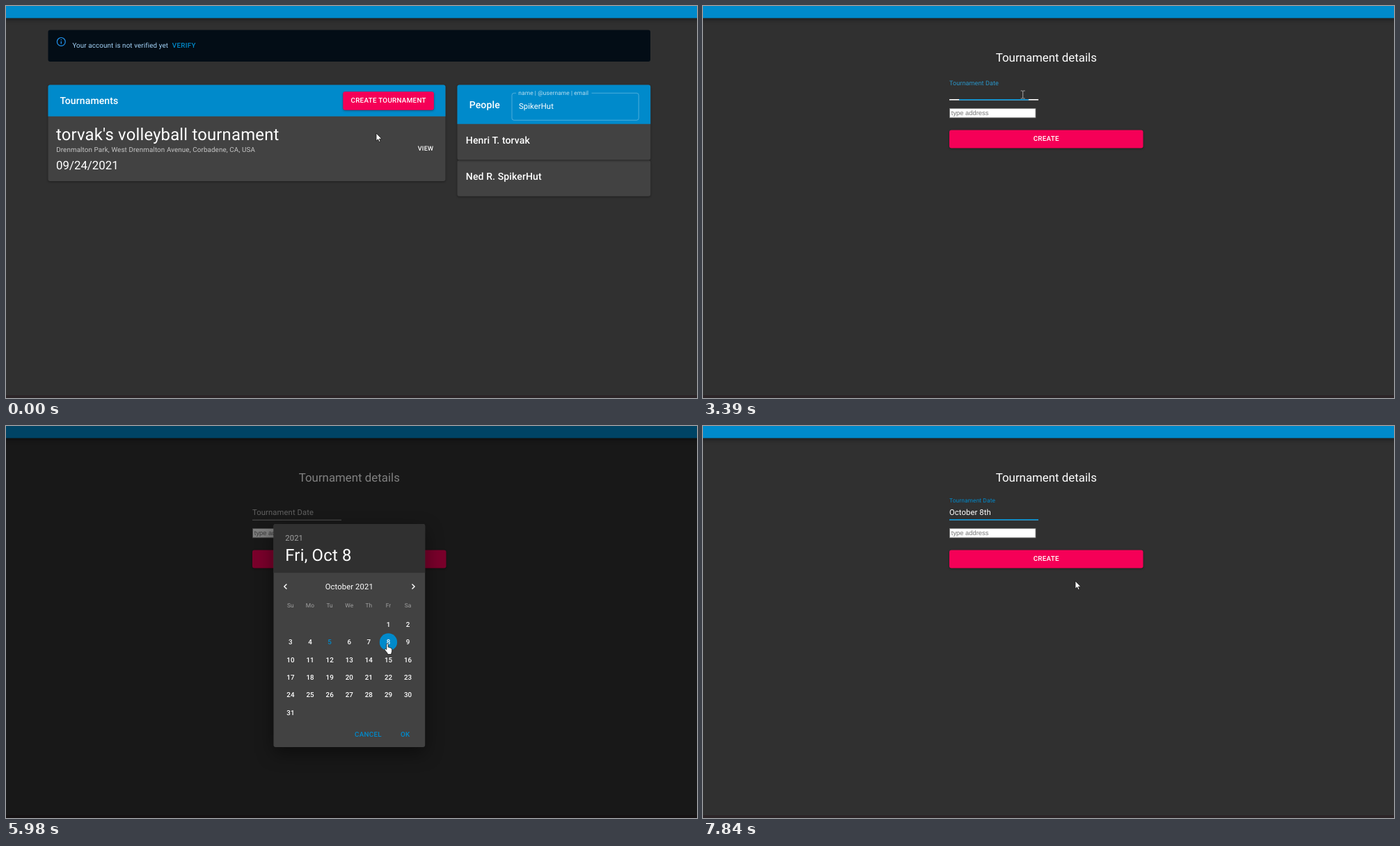
An HTML page that plays this animation: 993 by 564 pixels, repeating every 7990 ms.

```html
<!DOCTYPE html>
<html lang="en">
<head>
<meta charset="utf-8">
<title>Create a tournament</title>
<style>
  html, body { margin: 0; width: 100%; height: 100%; overflow: hidden; background: #303030; }
  svg { display: block; font-family: Roboto, sans-serif; text-rendering: geometricPrecision; }
  text { fill: #fff; white-space: pre; }
  .h4 { font-size: 23.9px; letter-spacing: .00735em; }
  .h5 { font-size: 16.87px; }
  .h6 { font-size: 14.06px; font-weight: 500; letter-spacing: .0075em; }
  .body { font-size: 11.25px; letter-spacing: .00938em; }
  .small { font-size: 9.84px; letter-spacing: .01071em; }
  .cap { font-size: 8.44px; letter-spacing: .00938em; }
  .btn { font-size: 9.84px; font-weight: 500; letter-spacing: .02857em; }
  .day { font-size: 9.84px; font-weight: 500; }
  .mid { text-anchor: middle; }
  .blue { fill: #008acb; }
  .paper { fill: #424242; }
  .pink { fill: #f50057; }
  .line { fill: none; stroke: #fff; }
  .lift { filter: drop-shadow(0 1.4px 1.6px rgba(0,0,0,.4)); }
  .bar { filter: drop-shadow(0 2px 3px rgba(0,0,0,.45)); }
  .high { filter: drop-shadow(0 9px 13px rgba(0,0,0,.45)); }
</style>
</head>
<body>
<svg width="993" height="564" viewBox="0 0 993 564">
  <rect width="993" height="564" fill="#303030"/>

  <g id="home">
    <rect x="60.5" y="34.5" width="865.5" height="45.5" rx="3" fill="#030d16"/>
    <circle cx="79.3" cy="51.4" r="5.9" class="line" style="stroke:#2196f3" stroke-width="1.2"/>
    <path d="M79.3 47.9v1.4M79.3 50.8v3.7" stroke="#2196f3" stroke-width="1.3"/>
    <text class="small" x="95.4" y="59.8" style="fill:#a6d5fa">Your account is not verified yet</text>
    <text class="btn blue" x="238.8" y="59.8">VERIFY</text>

    <rect class="paper lift" x="60.5" y="113.5" width="571" height="138.5" rx="3"/>
    <path class="blue" d="M60.5 158.7v-42.2q0-3 3-3h565q3 0 3 3v42.2z"/>
    <text class="h6" x="77.5" y="141.2">Tournaments</text>
    <rect id="add" class="pink lift" x="484.3" y="123.3" width="130.6" height="26.4" rx="3"/>
    <text class="btn" x="495.5" y="138.6">CREATE TOURNAMENT</text>
    <text class="h4" x="72" y="193">torvak's volleyball tournament</text>
    <text class="small" x="72.2" y="209.9" style="fill:#c6c6c6">Drenmalton Park, West Drenmalton Avenue, Corbadene, CA, USA</text>
    <text class="h5" x="72" y="234.6">09/24/2021</text>
    <text class="btn" x="591.7" y="208.1" style="font-size:9.14px">VIEW</text>

    <rect class="paper lift" x="648.5" y="222" width="277.7" height="51.7" rx="3"/>
    <rect class="paper lift" x="648.5" y="113.5" width="277.7" height="108" rx="3"/>
    <path class="blue" d="M648.5 169.7v-53.2q0-3 3-3h271.7q3 0 3 3v53.2z"/>
    <text class="h6" x="665.7" y="146.9">People</text>
    <path class="line" stroke-opacity=".3" d="M733 125.3h-3q-3 0-3 3v33q0 3 3 3h176.2q3 0 3-3v-33q0-3-3-3H841.5"/>
    <text class="cap" x="736.3" y="128.2" style="fill:#b8deef">name | @username | email</text>
    <text class="body" x="737" y="148.3">SpikerHut</text>
    <text class="h6" x="660.8" y="198.2">Henri T. torvak</text>
    <text class="h6" x="660.8" y="250.2">Ned R. SpikerHut</text>
  </g>

  <g id="form">
    <text class="h5 mid" x="493.3" y="79.5">Tournament details</text>
    <text id="label" class="body" x="354">Tournament Date</text>
    <text id="value" class="body" x="354" y="128.2">October 8th</text>
    <rect id="rule" x="354" width="128" fill="#fff"/>
    <rect id="focus" class="blue" y="134" height="1.6"/>
    <rect x="354.4" y="147.4" width="123.6" height="13.4" fill="#fff" stroke="#777" stroke-width=".8"/>
    <text x="356.8" y="157.4" style="font:9.37px 'Liberation Sans',Arial,sans-serif;fill:#757575">type address</text>
    <rect class="pink lift" x="354" y="178.4" width="278.5" height="26" rx="3"/>
    <text class="btn mid" x="493.3" y="194">CREATE</text>
  </g>

  <rect class="blue bar" x="-10" y="-10" width="1013" height="27.4"/>
  <rect y="560" width="993" height="4" fill="#2c2527"/>
  <rect id="shade" width="993" height="564"/>

  <g id="dialog">
    <rect class="paper high" x="384.5" y="141" width="217.7" height="321" rx="3"/>
    <path d="M384.5 211.3V144q0-3 3-3h211.7q3 0 3 3v67.3z" fill="#303030"/>
    <text class="body" x="401.3" y="165" style="fill:#a0a0a0">2021</text>
    <text id="picked" class="h4" x="401.3" y="194"></text>
    <text class="body mid" x="493.3" y="235.2">October 2021</text>
    <path class="line" stroke-width="1.4" d="M403.4 227.4l-3.6 3.6 3.6 3.6M583.5 227.4l3.6 3.6-3.6 3.6"/>
    <circle id="hover" r="12.65" fill="#fff" fill-opacity=".09"/>
    <circle id="dot" class="blue" r="12.65"/>
    <g id="days"></g>
    <rect id="okHover" class="blue" x="552.5" y="431.5" width="44" height="24" rx="3" fill-opacity=".13"/>
    <text class="btn blue" x="501" y="446.8">CANCEL</text>
    <text class="btn blue" x="567" y="446.8">OK</text>
  </g>

  <g id="cursor" fill="#fff" stroke="#111" stroke-width=".8" stroke-linejoin="round">
    <path id="arrow" d="M0 0V11.2L2.6 8.8 4.3 12.6 6.1 11.8 4.4 8.2H8z"/>
    <path id="hand" d="M0 .4Q1.2 .4 1.2 1.7V5.7Q2.8 5.3 3.1 6.5 4.7 6 5 7.2 6.7 6.9 6.7 8.6V11.2Q6.7 13 5.9 14V16H.2V14.6L-3.2 10.4Q-4.3 9-3.4 8.2-2.4 7.6-1.2 9.2V1.7Q-1.2.4 0 .4Z"/>
    <path id="beam" d="M-3-5.5H-1L0-5 1-5.5H3M0-5V5M-3 5.5H-1L0 5 1 5.5H3" fill="none" stroke="#c4c4c4"/>
  </g>
</svg>

<script>
const LOOP = 7990;
const $ = id => document.getElementById(id);
const set = (id, attrs) => { for (const k in attrs) $(id).setAttribute(k, attrs[k]); };
const show = (id, on) => { $(id).style.display = on ? '' : 'none'; };
const mix = (a, b, p) => a + (b - a) * p;

// Row in force at time t; each row starts with its time.
const held = (rows, t) => rows.findLast(r => r[0] <= t);

const CURSOR = [
  [0, 'arrow', 532, 183], [150, 'arrow', 470, 160], [270, 'arrow', 424, 143], [520, 'arrow', 481, 143],
  [670, 'hand', 510, 140], [790, 'hand', 531, 139], [940, 'hand', 538, 138], [1060, 'hand', 545, 136],
  [1210, 'hand', 552.5, 135.5], [1890, 'arrow', 552, 135],
  [2450, 'arrow', 535, 133], [2570, 'arrow', 505, 129], [2690, 'beam', 480, 127], [2810, 'beam', 468, 127],
  [2930, 'beam', 461, 127], [3240, 'beam', 459.7, 127.5], [3510, 'arrow', 460, 129], [3870, 'arrow', 460, 130],
  [4020, 'arrow', 495, 168], [4140, 'arrow', 530, 209], [4290, 'arrow', 540, 242], [4410, 'arrow', 546, 265],
  [4560, 'hand', 548, 283], [4680, 'hand', 550, 293], [4800, 'hand', 549, 303], [4920, 'hand', 548, 309],
  [5070, 'hand', 550, 310], [5190, 'hand', 548, 312.5],
  [6130, 'hand', 556, 340], [6250, 'hand', 565, 382], [6370, 'arrow', 573, 418], [6520, 'hand', 580, 436],
  [6640, 'hand', 577, 442], [6790, 'hand', 577.5, 442.5],
  [7300, 'arrow', 582, 432], [7420, 'arrow', 592, 418], [7570, 'arrow', 608, 350],
  [7690, 'arrow', 601, 295], [7840, 'arrow', 535, 223]
];
const MODAL = [[0, 0], [3510, .65], [3630, 1], [7060, .93], [7180, .2], [7300, 0]];
const FOCUS = [[0, 0], [3390, .78], [3510, .5], [3630, 0], [7060, .45], [7180, 1]];
const PRESS = [[0, 0], [670, .5], [790, 1]];

// October 2021 starts on a Friday, column 5.
const place = day => ({ x: 408.9 + 28.12 * ((day + 4) % 7), y: 285.6 + 25.3 * Math.floor((day + 4) / 7) });

function addText(str, x, y, cls) {
  const el = document.createElementNS('http://www.w3.org/2000/svg', 'text');
  el.textContent = str;
  el.setAttribute('class', cls + ' mid');
  el.setAttribute('x', x);
  el.setAttribute('y', y);
  $('days').append(el);
  return el;
}
['Su', 'Mo', 'Tu', 'We', 'Th', 'Fr', 'Sa'].forEach((d, i) =>
  addText(d, 408.9 + 28.12 * i, 261.3, 'cap').style.fill = '#a0a0a0');
const days = Array.from({ length: 31 }, (_, i) => {
  const p = place(i + 1);
  return addText(i + 1, p.x, p.y + 3.4, 'day');
});

function ring(id, day) {
  const p = place(day);
  set(id, { cx: p.x, cy: p.y });
}

function draw(t) {
  const onHome = t < 1890;
  show('home', onHome);
  show('form', !onHome);

  const press = held(PRESS, t)[1];
  $('add').style.fill = `rgb(${mix(245, 197, press)},${mix(0, 17, press)},${mix(87, 98, press)})`;

  const focus = held(FOCUS, t)[1];
  const over = t >= 2690 && t < 3510;
  const label = $('label');
  label.style.fontSize = mix(11.25, 8.44, focus) + 'px';
  label.style.fill = `rgb(${mix(193, 0, focus)},${mix(193, 138, focus)},${mix(193, 203, focus)})`;
  label.setAttribute('y', mix(128.2, 109.6, focus));
  show('value', t >= 7060);
  set('rule', over ? { y: 134, height: 1.6, opacity: 1 } : { y: 134.8, height: .8, opacity: .7 });
  set('focus', { x: 418 - 64 * focus, width: 128 * focus });

  const modal = held(MODAL, t)[1];
  set('shade', { opacity: modal / 2 });
  set('dialog', { opacity: modal });
  const chosen = t < 5740 ? 5 : 8;
  $('picked').textContent = chosen === 5 ? 'Tue, Oct 5' : 'Fri, Oct 8';
  days[4].style.fill = chosen === 5 ? '' : '#008acb';
  ring('dot', chosen);
  ring('hover', t < 4800 ? 1 : 8);
  show('hover', t >= 4560 && t < 5740);
  show('okHover', t >= 6520);

  const [, kind, x, y] = held(CURSOR, t);
  for (const k of ['arrow', 'hand', 'beam']) show(k, k === kind);
  set('cursor', { transform: `translate(${x} ${y})` });
}

const start = performance.now();
function tick() {
  draw((performance.now() - start) % LOOP);
  requestAnimationFrame(tick);
}
tick();
</script>
</body>
</html>
```
